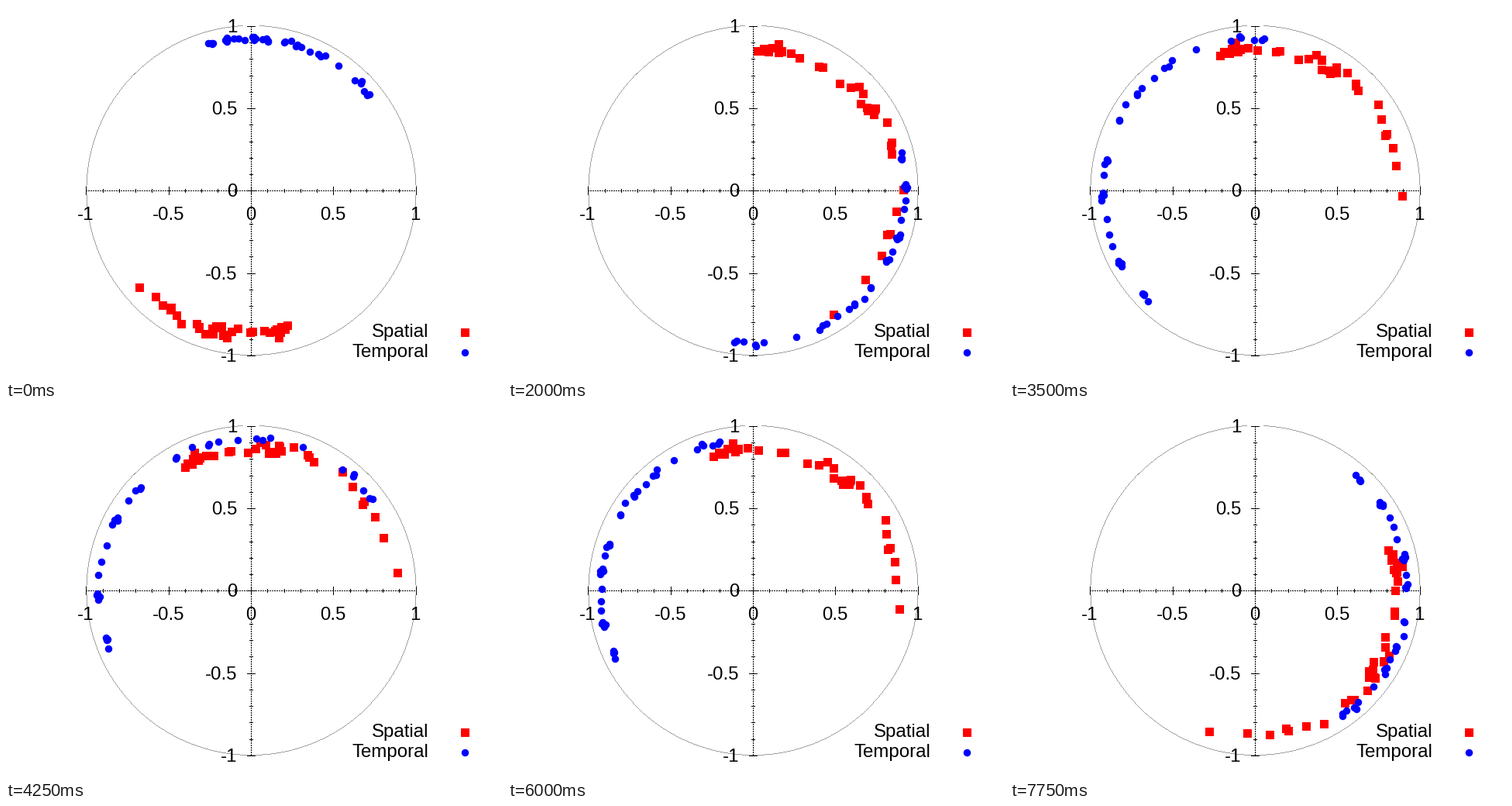
These frames come from a looping animation (640x480 px, 8000 ms). A matplotlib script:

```python
import numpy as np
import matplotlib.pyplot as plt
from matplotlib.animation import FuncAnimation

W, H, DPI = 640, 480, 100
FRAMES, INTERVAL = 32, 250
CX, CY, R = 316.5, 238.9, 212.6
PX = 72 / DPI
COUNT = 36

# Lowest, middle and highest angle of each group at a few key steps.
STEPS = [0, 5, 11, 17, 21, 28, 31]
SPATIAL = np.array([(-139, -105, -75), (-103, 34, 85), (-11, 34, 91),
                    (7, 79, 118), (-82, -9, 66), (93, 126, 160),
                    (-108, -36, 17)])
TEMPORAL = np.array([(39, 73, 106), (10, 69, 119), (56, 96, 170),
                     (37, 107, 202), (218, 267, 327), (-51, -25, 45),
                     (-55, -21, 49)])
# Extra sweep of the temporal group between neighbouring steps.
SWING = [80, -130, 40, 0, 0, 40]

fig = plt.figure(figsize=(W / DPI, H / DPI), dpi=DPI, facecolor="white")
ax = fig.add_axes([0, 0, 1, 1])
ax.set_xlim(0, W)
ax.set_ylim(H, 0)
ax.axis("off")


def line(x0, y0, x1, y1, **kw):
    x, y = np.floor([x0, x1]) + 0.5, np.floor([y0, y1]) + 0.5
    ax.plot(x, y, color="black", lw=PX, antialiased=False, snap=False,
            solid_capstyle="butt", **kw)


def label(x, y, text, ha):
    ax.text(x, y, text, ha=ha, va="baseline", size=24 * PX,
            family="Liberation Sans", color="black")


def markers(x, y, shape, color, size):
    return ax.plot(np.floor(x), np.floor(y), shape, color=color, ms=size * PX,
                   mew=0, antialiased=False, zorder=5)[0]


def squares(x, y):
    return markers(x, y, "s", "red", 11)


def dots(x, y):
    return markers(x, y, "o", "blue", 9.5)


def draw_ring():
    """One-pixel ring, open where it meets the top tick."""
    k = np.arange(-151, 152)
    s = np.sqrt(R ** 2 - k ** 2)
    top = abs(k) > 10
    for x, y in [(k[top], -s[top]), (k, s), (s, k), (-s, k)]:
        ax.plot(np.floor(CX + x), np.floor(CY + y), ",", color="#a0a0a0")


def draw_axes():
    dotted = dict(linestyle=(0, (2, 2)), dash_capstyle="butt")
    line(CX - R, CY, CX + R, CY, **dotted)
    line(CX, CY - R, CX, CY + R, **dotted)
    for k in range(-10, 11):
        major = k % 5 == 0
        size = 5 if major else 2
        x, y = CX + k / 10 * R, CY - k / 10 * R
        line(x, CY - size, x, CY + size)
        line(CX - size, y, CX + size, y)
        if major:
            text = f"{k / 10:g}"
            label(x - 1, 275.5, text, "center")
            label(298.5, y + 7.5, text, "right")


def draw_legend():
    label(545, 427.5, "Spatial", "right")
    label(545, 453.5, "Temporal", "right")
    squares([592], [421])
    dots([592], [447])


def spread(seed, radius, noise):
    """Fixed place of each point: position within the group, and radius."""
    rng = np.random.default_rng(seed)
    u = rng.uniform(-1, 1, COUNT)
    u[:2] = -1, 1
    u = np.sign(u) * abs(u) ** 1.3
    return u, R * (radius + noise * np.clip(rng.normal(size=COUNT), -2, 1.6))


def place(limits, group):
    low, mid, high = limits
    u, r = group
    a = np.radians(mid + u * np.where(u < 0, mid - low, high - mid))
    return np.floor(CX + r * np.cos(a)), np.floor(CY - r * np.sin(a))


def limits_at(table, frame):
    return [np.interp(frame, STEPS, column) for column in table.T]


def swing_at(frame):
    k = min(np.searchsorted(STEPS, frame, side="right") - 1, len(SWING) - 1)
    u = (frame - STEPS[k]) / (STEPS[k + 1] - STEPS[k])
    return SWING[k] * np.sin(np.pi * u)


draw_ring()
draw_axes()
draw_legend()
spatial, temporal = squares([], []), dots([], [])
spatial_group = spread(4, 0.872, 0.025)
temporal_group = spread(9, 0.927, 0.011)


def update(frame):
    spatial.set_data(*place(limits_at(SPATIAL, frame), spatial_group))
    limits = np.add(limits_at(TEMPORAL, frame), swing_at(frame))
    temporal.set_data(*place(limits, temporal_group))
    return spatial, temporal


anim = FuncAnimation(fig, update, frames=FRAMES, interval=INTERVAL,
                     init_func=lambda: update(0), repeat=True, repeat_delay=0)
plt.show()
```
